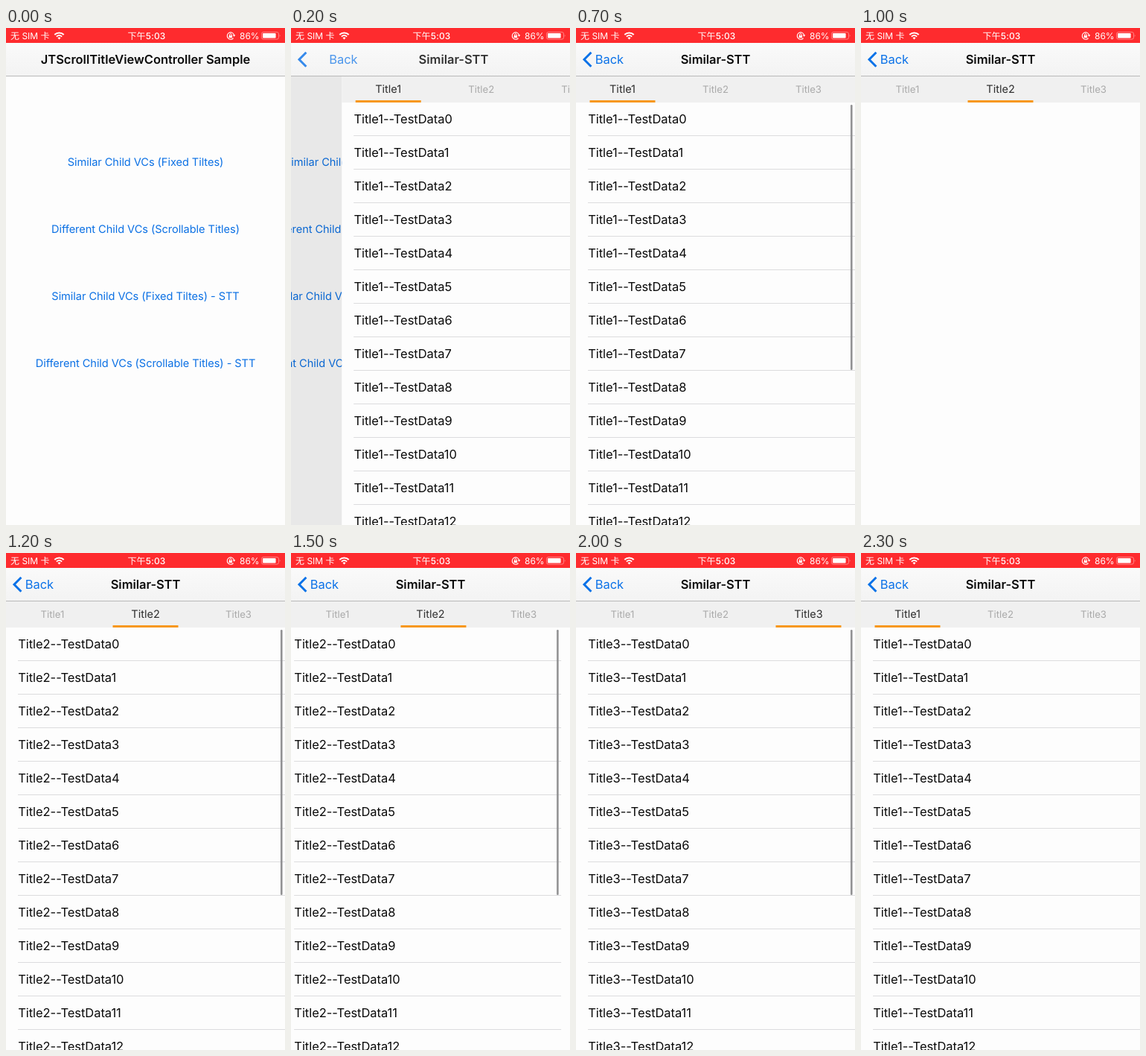
An HTML page that plays this animation: 375 px wide and 667 px high, repeating every 2400 ms.

```html
<!DOCTYPE html>
<html lang="zh-CN">
<head>
<meta charset="utf-8">
<title>Scroll titles</title>
<style>
  html, body { margin: 0; width: 100%; height: 100%; overflow: hidden; background: #fdfdfd; }
  svg { display: block; width: 375px; height: 667px; }
  text {
    font-family: Inter, "Noto Sans CJK SC", "Noto Sans CJK", sans-serif;
    font-feature-settings: "calt" 0;
    text-rendering: geometricPrecision;
  }
  .mid { text-anchor: middle; }
  .link { font-size: 14.6px; letter-spacing: -.06px; fill: #0b70e4; }
  .row { font-size: 16.5px; letter-spacing: -.05px; fill: #0a0a0a; }
  .head { font-size: 16.5px; letter-spacing: -.03px; font-weight: 600; fill: #0a0a0a; }
  .back { font-size: 16.5px; letter-spacing: -.1px; fill: #0b72e8; }
  .tab { font-size: 13.2px; }
  .status { font-size: 12px; fill: #fff; }
  .clock { font-weight: 500; letter-spacing: .15px; }
</style>
</head>
<body>
<svg viewBox="0 0 375 667">
  <defs>
    <linearGradient id="navFill" x2="0" y2="1">
      <stop offset="0" stop-color="#fafafa"/>
      <stop offset="1" stop-color="#f3f3f3"/>
    </linearGradient>
  </defs>
  <rect width="375" height="667" fill="#fdfdfd"/>

  <g id="menu">
    <text class="link mid" x="187.5" y="185">Similar Child VCs (Fixed Tiltes)</text>
    <text class="link mid" x="187.5" y="275">Different Child VCs (Scrollable Titles)</text>
    <text class="link mid" x="187.5" y="365">Similar Child VCs (Fixed Tiltes) - STT</text>
    <text class="link mid" x="187.5" y="455">Different Child VCs (Scrollable Titles) - STT</text>
  </g>
  <rect id="dim" width="375" height="667"/>

  <g id="list">
    <rect y="65" width="375" height="602" fill="#fdfdfd"/>
    <g id="pages"></g>
    <rect y="65" width="375" height="35" fill="#f0f0f0"/>
    <g id="tabs"></g>
    <rect id="line" x="18.5" y="97" width="88" height="3" fill="#f7981d"/>
  </g>

  <rect y="20" width="375" height="44" fill="url(#navFill)"/>
  <rect y="64" width="375" height="1" fill="#b9b9b9"/>
  <text id="menuHead" class="head mid" x="187.5" y="48">JTScrollTitleViewController Sample</text>
  <text id="listHead" class="head mid" x="187.5" y="48">Similar-STT</text>
  <path id="chevron" d="M20.4 32.8L11 42.3L20.4 51.8" fill="none" stroke="#0b72e8" stroke-width="3"/>
  <text id="back" class="back" x="25.8" y="48">Back</text>

  <rect width="375" height="20" fill="#fe2b2e"/>
  <text class="status" x="6" y="14.6">无 SIM 卡</text>
  <g fill="none" stroke="#fff" stroke-width="2">
    <path d="M65.3 9a8.8 8.8 0 0 1 12.4 0M67.9 11.6a5.1 5.1 0 0 1 7.2 0"/>
    <path d="M71.5 15.4l-2-2.1a2.9 2.9 0 0 1 4 0z" fill="#fff" stroke="none"/>
  </g>
  <text class="status clock mid" x="189" y="14.6">下午5:03</text>
  <path d="M305.6 13.6A4.7 4.7 0 1 1 306.6 9.6" fill="none" stroke="#fff" stroke-width="1.1"/>
  <path d="M304.7 9.3h3.6l-1.7 2.4z" fill="#fff"/>
  <rect x="299.7" y="10" width="4.4" height="3.2" fill="#fff"/>
  <path d="M300.6 10V9a1.3 1.3 0 0 1 2.6 0v1" fill="none" stroke="#fff" stroke-width=".9"/>
  <text class="status" x="314" y="14.6">86%</text>
  <rect x="343.5" y="5.5" width="23" height="9.6" rx="2.4" fill="none" stroke="#fff" stroke-opacity=".4"/>
  <rect x="345" y="7" width="17.6" height="6.6" rx="1" fill="#fff"/>
  <path d="M367.8 8.5q1.5 1.8 0 3.6z" fill="#fff" fill-opacity=".5"/>
</svg>
<script>
const LOOP = 2400, STEP = 100, WIDTH = 375, ROW = 45, TAB = 125;
const LOADED = [0, 1100, 1900];
const BAR_ON = [700, 1200, 2000];
const JUMP = 2200;

const $ = id => document.getElementById(id);
const clamp = v => Math.min(1, Math.max(0, v));

function add(parent, tag, attrs, text) {
  const el = document.createElementNS("http://www.w3.org/2000/svg", tag);
  for (const k in attrs) el.setAttribute(k, attrs[k]);
  if (text) el.textContent = text;
  parent.appendChild(el);
  return el;
}

const shift = (el, x) => el.setAttribute("transform", `translate(${x.toFixed(2)} 0)`);

function ease(t, start, length) {
  const u = clamp((t - start) / length);
  return u * u * (3 - 2 * u);
}

// Critically damped spring, 1 at the start and 0 at rest.
function spring(t, start, rate) {
  const u = Math.max(0, t - start) / 1000 * rate;
  return u > 9.5 ? 0 : (1 + u) * Math.exp(-u);
}

const pages = [0, 1, 2].map(i => {
  const page = add($("pages"), "g", { transform: `translate(${i * WIDTH} 0)` });
  const rows = add(page, "g", {});
  for (let n = 0; n < 13; n++) {
    const y = 100 + n * ROW;
    add(rows, "text", { class: "row", x: 16.2, y: y + 28 }, `Title${i + 1}--TestData${n}`);
    add(rows, "rect", { x: 16, y: y + 44, width: WIDTH - 16, height: 1, fill: "#dcdcde" });
  }
  const bar = add(page, "rect", { x: 369, y: 103, width: 2.6, height: 356, rx: 1.3, fill: "#929294" });
  return { rows, bar };
});

const tabs = [0, 1, 2].map(i =>
  add($("tabs"), "text", { class: "tab mid", y: 4.7 }, `Title${i + 1}`));

function drawPush(t) {
  const rest = spring(t, 70, 24), done = 1 - rest;
  shift($("menu"), -112 * done);
  $("dim").setAttribute("opacity", 0.1 * done);
  shift($("list"), WIDTH * rest);
  shift($("menuHead"), -150 * done);
  $("menuHead").setAttribute("opacity", clamp(1 - 1.6 * done));
  shift($("listHead"), 170 * rest);
  $("listHead").setAttribute("opacity", done);
  $("chevron").setAttribute("opacity", done);
  shift($("back"), 140 * rest);
  $("back").setAttribute("opacity", clamp(1.5 * done - 0.5));
}

function drawPages(t) {
  const swiped = ease(t, 700, 300) + ease(t, 1468, 300);
  const pos = t < JUMP ? swiped : 0;
  const linePos = swiped - 2 * ease(t, 2100, 200);

  shift($("pages"), -pos * WIDTH);
  shift($("line"), linePos * TAB);

  pages.forEach(({ rows, bar }, i) => {
    rows.setAttribute("visibility", t >= LOADED[i] ? "visible" : "hidden");
    const fadeIn = i ? 0 : 200;
    const shown = fadeIn ? clamp((t - BAR_ON[i] + fadeIn) / fadeIn) : +(t >= BAR_ON[i]);
    bar.setAttribute("opacity", t < JUMP ? shown : 0);
  });

  tabs.forEach((tab, i) => {
    const near = clamp(1 - Math.abs(i - pos));
    const c = Math.round(170 - 125 * near);
    tab.setAttribute("fill", `rgb(${c},${c},${c})`);
    tab.setAttribute("transform", `translate(${TAB * (i + 0.5)} 82.2) scale(${1 + 0.1 * near})`);
  });
}

let origin = null;
function frame(now) {
  if (origin === null) origin = now;
  const t = Math.floor(((now - origin) % LOOP) / STEP) * STEP;
  drawPush(t);
  drawPages(t);
  requestAnimationFrame(frame);
}
drawPush(0);
drawPages(0);
requestAnimationFrame(frame);
</script>
</body>
</html>
```
